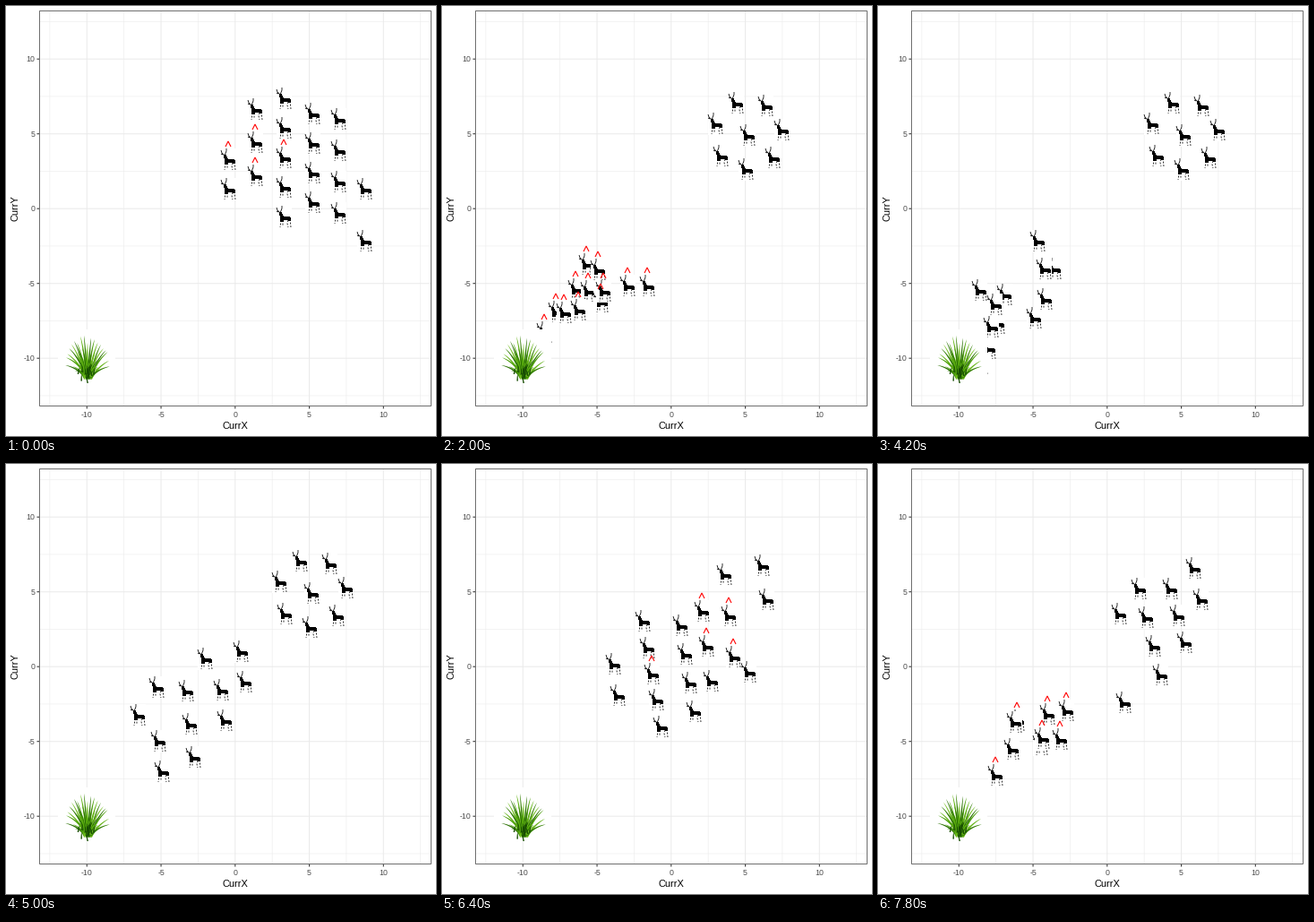
A matplotlib script for the animation above (8000 ms loop, 480x480 px).

```python
import numpy as np
import matplotlib.pyplot as plt
from matplotlib.animation import FuncAnimation
from matplotlib.patches import PathPatch, Polygon, Rectangle
from matplotlib.path import Path
from matplotlib.transforms import Affine2D

SIZE, DPI = 480, 100
FRAMES, STEP_MS = 40, 200
SPEED = 21.8                      # pixels per frame on the way to or from food
REACH = 26                        # distance at which the grass is reached
GRASS = np.array([90.0, 393.0])
LEFT, RIGHT, TOP, BOTTOM = 37.5, 474.5, 5.5, 446.5


def pt(px):
    return px * 72 / DPI


fig = plt.figure(figsize=(SIZE / DPI, SIZE / DPI), dpi=DPI, facecolor="white")
ax = fig.add_axes([0, 0, 1, 1])
ax.set_xlim(0, SIZE)
ax.set_ylim(SIZE, 0)
ax.axis("off")


# ---------- chart ----------
def px_x(v):
    return 255.8 + 16.55 * v


def px_y(v):
    return 226.2 - 16.7 * v


def rule(xs, ys, color, width, z):
    ax.plot(xs, ys, color=color, lw=pt(width), zorder=z, snap=False,
            solid_capstyle="butt")


def draw_chart():
    for v in np.arange(-12.5, 13, 5):
        rule([px_x(v)] * 2, [TOP, BOTTOM], "#ebebeb", 0.55, 0)
        rule([LEFT, RIGHT], [px_y(v)] * 2, "#ebebeb", 0.55, 0)
    label = dict(family="Liberation Sans", size=pt(8.8), color="#4d4d4d")
    for v in range(-10, 11, 5):
        x, y = px_x(v), px_y(v)
        rule([x, x], [TOP, BOTTOM], "#ebebeb", 1.07, 0.5)
        rule([LEFT, RIGHT], [y, y], "#ebebeb", 1.07, 0.5)
        rule([x, x], [BOTTOM, BOTTOM + 3], "#333333", 1.07, 0.6)
        rule([LEFT - 3, LEFT], [y, y], "#333333", 1.07, 0.6)
        ax.text(x, 459.3, str(v), ha="center", va="baseline", **label)
        ax.text(32.5, y + 3.1, str(v), ha="right", va="baseline", **label)
    ax.add_patch(Rectangle((LEFT, TOP), RIGHT - LEFT, BOTTOM - TOP, fill=False,
                           ec="#6f6f6f", lw=pt(1), snap=False, zorder=90))
    title = dict(family="Liberation Sans", size=pt(11), color="black")
    ax.text(255.8, 472, "CurrX", ha="center", va="baseline", **title)
    ax.text(16, 226, "CurrY", ha="right", va="center", rotation=90, **title)


# ---------- grass ----------
def blade(base, tip, bend, width, color, z):
    base, tip = np.array(base, float), np.array(tip, float)
    mid = (base + tip) / 2 + [bend, -3]
    t = np.linspace(0, 1, 12)[:, None]
    curve = (1 - t) ** 2 * base + 2 * t * (1 - t) * mid + t ** 2 * tip
    slope = np.gradient(curve, axis=0)
    normal = np.c_[-slope[:, 1], slope[:, 0]]
    normal /= np.linalg.norm(normal, axis=1)[:, None]
    half = normal * width / 2 * (1 - t) ** 0.6
    ax.add_patch(Polygon(np.r_[curve + half, (curve - half)[::-1]],
                         fc=color, ec="none", zorder=z))


def draw_grass():
    rng = np.random.default_rng(4)
    ax.add_patch(Rectangle((58, 361), 64, 61, fc="white", ec="none", zorder=50))
    greens = ["#2b7203", "#4a9c08", "#5fb10f", "#358004", "#73bf22"]
    for layer, (count, low, high, width) in enumerate([(19, 36, 47, 2.3),
                                                       (26, 14, 34, 1.8)]):
        for i, a in enumerate(np.linspace(-1.45, 1.45, count)):
            r = rng.uniform(low, high)
            spread = 25 if layer == 0 else 0.6 * r
            tip = (91 + spread * np.sin(a), 414 - r * np.cos(a) ** 0.6)
            root = (91 + 4 * np.sin(a), 413 + rng.uniform(-4, 4))
            blade(root, tip, -3.5 * np.sin(a), width, greens[i % 5], 51 + layer)
    for _ in range(18):
        x, y = 91 + rng.normal(0, 4), 409 + rng.normal(0, 4)
        blade((x, y + 3), (x + rng.uniform(-3, 3), y - 4), 0, 1.5, "#174d02", 53)


# ---------- herd movement ----------
def columns(lean, *cols):
    """Loose columns of animals, each given as x, top, count and spacing."""
    return np.array([(x + lean * k, top + gap * k)
                     for x, top, count, gap in cols for k in range(count)], float)


def toward_grass(p, dist):
    way = GRASS - p
    return p + way / np.hypot(*way) * dist


def gap_to(p, q):
    return np.hypot(*(np.asarray(p) - q))


def match(animals, spots):
    """Give every animal a spot, swapping pairs while that shortens the walks."""
    cost = ((np.asarray(animals)[:, None] - spots[None]) ** 2).sum(-1)
    pick, n = list(range(len(spots))), len(spots)
    better = True
    while better:
        better = False
        for a in range(n):
            for b in range(a):
                now = cost[a, pick[a]] + cost[b, pick[b]]
                if cost[a, pick[b]] + cost[b, pick[a]] < now - 1e-9:
                    pick[a], pick[b] = pick[b], pick[a]
                    better = True
    return pick


herd_at_start = columns(0, (248, 172, 2, 33), (278, 116, 3, 37),
                        (310, 104, 5, 33), (342, 121, 4, 33),
                        (371, 127, 4, 35), (400, 205, 2, 58))
returned = columns(4, (147, 281, 1, 0), (168, 250, 1, 0), (170, 310, 2, 34),
                   (201, 254, 3, 37), (222, 218, 1, 0), (240, 253, 2, 34),
                   (262, 210, 2, 34))
reunited = columns(5, (191, 224, 2, 35), (224, 176, 5, 29.5), (266, 181, 4, 32),
                   (290, 165, 3, 39), (315, 124, 3, 46), (342, 233, 1, 0),
                   (357, 114, 2, 38))
remaining = columns(8, (269, 168, 1, 0), (291, 140, 4, 32), (326, 140, 3, 30),
                    (352, 117, 2, 35), (274, 267, 1, 0))
turns = np.radians(200 + 50.5 * np.arange(7))
ring = np.vstack([[341, 145], [341, 145] + 38 * np.c_[np.cos(turns),
                                                      np.sin(turns)]])

stayers = [5, 10, 11, 14, 15, 16, 18, 19]
feeders = [i for i in range(20) if i not in stayers]
first_callers, late_callers = (0, 3, 4, 7), (9, 13, 17)
second_callers = {4: 31, 11: 31, 12: 31, 15: 31, 16: 31, 2: 33}   # by new place
followers = (0, 1, 5)

knots = [{0: p} for p in herd_at_start]
calls = [[] for _ in knots]


def settle_stayers():
    for i, k in zip(stayers, match(herd_at_start[stayers], ring)):
        knots[i].update({10: ring[k], 25: ring[k]})


def feed():
    arrival = {}
    for i in feeders:
        p = herd_at_start[i]
        go = 2.5 if i in late_callers else 0.42
        arrival[i] = go + (gap_to(p, GRASS) - REACH) / SPEED
        knots[i][go] = p
        knots[i][arrival[i]] = toward_grass(p, gap_to(p, GRASS) - REACH)
        seen = 0 if i in first_callers else 2 if i in late_callers else 1
        calls[i].append((seen, arrival[i]))

    # graze outwards, then walk home: first to eat, first and farthest back
    home = sorted(returned, key=lambda p: -gap_to(p, GRASS))
    for rank, i in enumerate(sorted(feeders, key=arrival.get)):
        a = np.radians(-105 + 50 * rank)
        out = np.array([np.cos(a), np.sin(a)])
        radius = 12 * (16 - arrival[i])
        if radius > 0:
            knots[i][16] = GRASS + out * radius
            here = knots[i][16]
        else:
            here = knots[i][arrival[i]]
        leave = 25 - gap_to(here, home[rank]) / SPEED
        if leave > 16.3:
            knots[i][leave] = here + out * 4 * (leave - 16)
        knots[i][25] = home[rank]


def reunite():
    place_of = match([k[25] for k in knots], reunited)
    resting = []
    for i, s in enumerate(place_of):
        p = knots[i][32] = reunited[s]
        if s in second_callers or s in followers:
            go = max(32, second_callers.get(s, 35.5))
            knots[i][go] = p
            knots[i][39] = toward_grass(p, (39 - go) * SPEED)
            if s in second_callers:
                calls[i].append((second_callers[s], FRAMES))
        else:
            resting.append(i)
    for i, k in zip(resting, match([knots[i][32] for i in resting], remaining)):
        knots[i][39] = remaining[k]


settle_stayers()
feed()
reunite()


def place(i, f):
    times = sorted(knots[i])
    pts = np.array([knots[i][t] for t in times])
    return np.round([np.interp(f, times, pts[:, k]) for k in (0, 1)])


# ---------- animals ----------
def strokes(*lines):
    return Path.make_compound_path(*[Path(np.array(p, float)) for p in lines])


body = Path([(-5, -4), (-3, -6), (-1, -2), (1, 0), (5, -1), (7, 0), (8, 2),
             (7, 4), (5, 3), (3, 2), (0, 3), (-1, 5), (-4, 4), (-3, 0),
             (-4, -2), (-5, -4)])
antlers = strokes([(-8, -11), (-7, -8), (-4, -5)], [(-8, -7), (-6, -6)],
                  [(-2, -13), (-2, -10), (-4, -5)])
legs = strokes([(-3, 3), (-4, 11)], [(-1, 3), (-1, 10)],
               [(5, 3), (4, 7), (5, 11)], [(7, 2), (8, 11)])
caret = strokes([(-3, -15), (0, -21), (3, -15)])


class Deer:
    def __init__(self, i):
        z = 2 + i
        self.i = i
        thin = dict(fill=False, ec="black", snap=False, zorder=z + 0.2)
        self.mark = PathPatch(caret, fill=False, ec="red", lw=pt(1.1),
                              joinstyle="miter", snap=False, zorder=70)
        self.parts = [
            PathPatch(Path([(-8.5, -13.5), (8.5, -13.5), (8.5, 12), (-8.5, 12)]),
                      fc="white", ec="none", zorder=z),
            PathPatch(body, fc="black", ec="none", aa=False, zorder=z + 0.1),
            PathPatch(antlers, lw=pt(0.8), **thin),
            PathPatch(legs, lw=pt(0.8), ls=(0, (2.5, 2)), **thin),
            self.mark,
        ]
        for p in self.parts:
            ax.add_patch(p)

    def move(self, f):
        shift = Affine2D().translate(*place(self.i, f)) + ax.transData
        for p in self.parts:
            p.set_transform(shift)
        self.mark.set_visible(any(a <= f < b for a, b in calls[self.i]))


draw_chart()
draw_grass()
herd = [Deer(i) for i in range(len(knots))]


def update(f):
    for deer in herd:
        deer.move(f)
    return []


anim = FuncAnimation(fig, update, frames=FRAMES, interval=STEP_MS,
                     init_func=lambda: update(0), repeat=True, repeat_delay=0)
plt.show()
```
